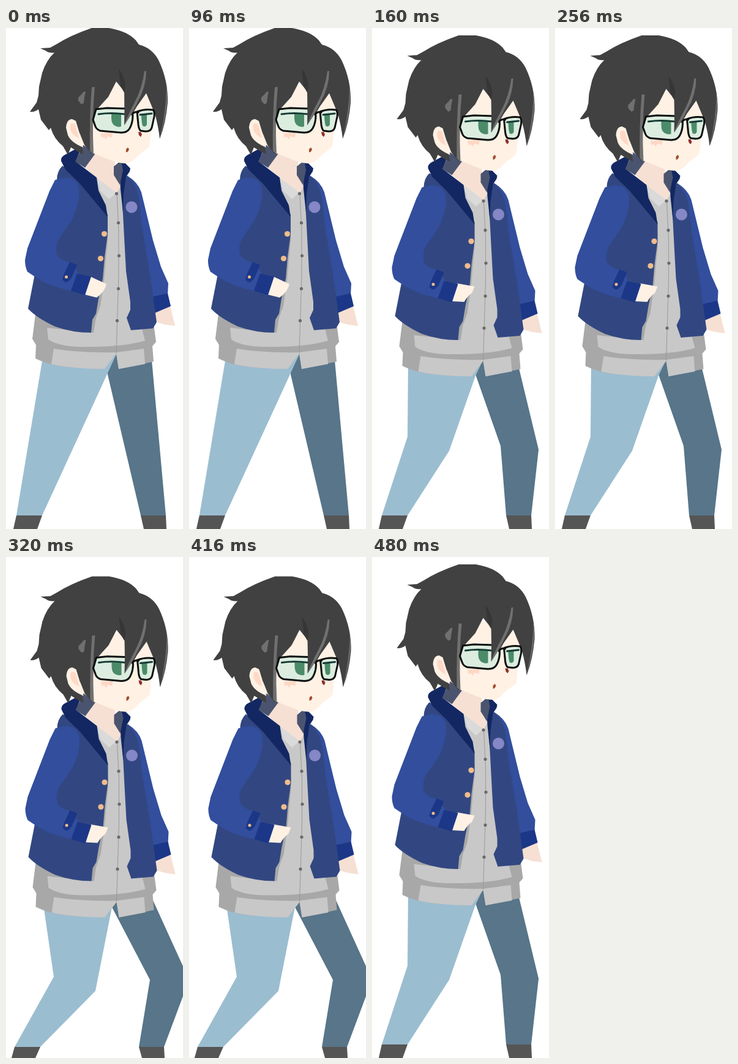
Write an HTML page with a canvas that moves like this. It is 289 px wide and 814 px high and loops after 640 ms.

```html
<!DOCTYPE html>
<html lang="en">
<head>
<meta charset="utf-8">
<title>Walk cycle</title>
<style>
html, body { margin: 0; width: 100%; height: 100%; overflow: hidden; background: #fff; }
canvas { display: block; width: 289px; height: 814px; }
</style>
</head>
<body>
<canvas id="stage" width="289" height="814"></canvas>
<script>
const ctx = document.getElementById('stage').getContext('2d');
const HOLD = 160;

const C = {
  hair: '#414141', hairDark: '#363636', shine: '#707070',
  skin: '#fff1e4', shade: '#f6e0d3', blush: '#ffd8c6',
  body: '#324781', sleeve: '#324e9d', cuff: '#1c3787', collar: '#132762', lining: '#4b546f',
  shirt: '#c8c8c8', fold: '#a8a8a8', tip: '#dadada', stud: '#6a6a6a', gold: '#efbc8c',
  lens: '#dcede0', iris: '#4b8b69', frame: '#0c0f0e',
  near: '#9bbdd0', far: '#587589', shoe: '#555555', badge: '#8587c6'
};

function fill(color, d) {
  ctx.fillStyle = color;
  ctx.fill(new Path2D(d + 'Z'));
}
function line(color, width, d) {
  ctx.strokeStyle = color;
  ctx.lineWidth = width;
  ctx.stroke(new Path2D(d));
}
function dot(color, x, y, r) {
  ctx.fillStyle = color;
  ctx.beginPath();
  ctx.arc(x, y, r, 0, Math.PI * 2);
  ctx.fill();
}

const handLow = 'M138 404L164 416Q161 429 148 438L128 433';
const handHigh = 'M138 403L166 408L162 418Q154 424 149 433L129 432';

// Body offset, hand, leg outlines and foot position for each pose
const poses = [
  { x: 0, y: 0, hand: handLow, foot: 17, floor: 792,
    near: 'M60 535L182 526L59 792H17',
    far: 'M166 518H236L238 540L261 792H220L166 563' },
  { x: 1.5, y: 12, hand: handHigh, foot: 16, floor: 792,
    near: 'M59 545L182 538L169 565L126 687L58 792H16L58 664',
    far: 'M167 530H236L240 553L272 685L260 792H219L210 679L169 563' },
  { x: 0.5, y: 31.5, hand: handHigh, foot: 14, floor: 796,
    near: 'M61 565L182 557L173 569L146 705L56 796H14L78 682',
    far: 'M170 550H236L241 560L299 687L258 796H217L235 687L173 569' }
];

function legs(p) {
  fill(C.far, p.far);
  fill(C.near, p.near);
  const f = p.foot, y = p.floor;
  fill(C.shoe, `M${f} ${y}h42L${f + 34} 814H${f - 5}`);
  fill(C.shoe, `M${f + 203} ${y}h41L${f + 245} 814H${f + 208}`);
}

function shirt() {
  fill(C.fold, 'M48 465L43 505L49 515L48 537Q70 548 100 551L161 554L180 529L184 554L241 542L239 517L245 510L241 480L190 440L150 440');
  fill(C.shirt, 'M140 232L193 242L206 460L204 490L222 489L227 508Q190 519 120 518Q85 517 69 506L67 487L140 495L150 460L158 400');
  fill(C.fold, 'M166 320L166 345L163 375L160 410L154 452L147 470L143 495H138L146 440');
  fill(C.shirt, 'M78 521Q120 528 180 527L225 521L227 546L184 554L180 529L161 554Q100 553 74 546');
  line('#999999', 1, 'M181 270L184 330L184 400L180 528');
}

function jacket(p) {
  // far arm
  fill(C.shade, 'M242 462L268 452L276 484L260 482L246 478');
  fill(C.sleeve, 'M198 240Q216 251 221 267L240 345L253 388L265 415L264 433L238 438L214 330');
  fill(C.cuff, 'M238 437L264 431L269 452L243 463');
  // front panels
  fill(C.body, 'M188 246L198 240Q214 255 217 278L222 322L235 400L246 478L240 488L204 491L197 471L203 458L203 445L196 395L193 340');
  fill(C.body, 'M92 224Q83 233 83 247L60 320L47 400L36 456Q50 471 80 485Q108 495 139 495L141 474L147 464L151 440L158 407L161 372L166 335L166 304L140 246');
  dot(C.gold, 160.5, 334.5, 4.6);
  dot(C.gold, 154.5, 374.5, 4.6);
  dot(C.badge, 205, 291, 9.5);
  // near arm
  fill(C.sleeve, 'M80 247Q112 236 119 259Q122 285 106 314L86 343Q80 357 83 368Q90 380 108 381L119 400L112 428Q72 421 47 404L35 396Q31 388 31 377L35 358L71 265');
  fill(C.skin, p.hand);
  fill(C.cuff, 'M116 399L139 404L129 434L106 427');
  fill(C.cuff, 'M104 380L116 385L107 406Q101 414 97 413L92 409L95 399');
  dot(C.gold, 98.5, 404.5, 2.5);
}

function neck() {
  fill(C.tip, 'M146 238L181 267L168 278L154 265');
  fill(C.shade, 'M114 214L127 190L144 196L178 217L178 238L187 257L181 268L146 242');
  fill(C.collar, 'M189 213L194 219L203 228L202 233L196 242L192 270L191 300L187 262L186 240');
  fill(C.lining, 'M176 225L188 215L191 231L186 255L176 239');
  fill(C.collar, 'M124 191L98 205Q89 209 90 216L97 230L120 252L166 307L163 288L151 264L148 243L114 217');
  fill(C.lining, 'M126 190L146 204L129 227L113 217');
  [[180.5, 269], [183.5, 316.5], [184.5, 370], [183.5, 423.5], [181.5, 475.5]]
    .forEach(([x, y]) => dot(C.stud, x, y, 2.6));
}

function face() {
  fill(C.skin, 'M120 110L225 80L245 135Q238 150 236 175L234 193L216 207Q206 219 198 220Q185 220 174 216L141 203L122 185');
  fill(C.blush, 'M155 171L174 170L173 178L166 176L163 181L160 177L155 178');
  fill('#8f302c', 'M216 169L220 169L222 173L220 177L217 174');
  fill('#a34a2b', 'M199 194L201 197L199 201L196 202L196 197');
}

function hair() {
  fill(C.hair, 'M56 33L72 32L83 26Q105 12 140 0H168Q198 5 212 20L217 27Q238 32 249 52Q265 85 264 121Q261 155 251 180Q249 161 243 139L229 106L214 127L205 142L194 158L193 103L180 87L167 112L147 134L142 150L140 205L128 190L120 170L126 205L119 202L106 194L101 206L93 192Q78 180 73 162L70 166L57 149L53 132Q47 137 39 136L50 121L53 110L54 95L59 73Q66 52 79 40Q70 41 65 37');
  fill(C.skin, 'M98 162Q99 148 108 148L114 151L121 174L126 194Q106 186 101 174');
  fill(C.blush, 'M105 156Q112 153 114 160L119 179Q108 174 105 165');
  fill(C.shine, 'M118 113L124 107L126 104L130 103L128 113L127 122L123 124L118 118');
  fill(C.shine, 'M140 96L145 96Q140 145 143 205L137 200Q136 145 140 96');
  fill(C.shine, 'M262 94Q267 126 251 180Q262 132 262 94');
}

function glasses() {
  const left = 'M147 132L165 130L195 131Q203 132 207 142Q207 154 202 163Q198 170 188 170L154 167Q148 165 146 160L142 149Z';
  const right = 'M214 136Q226 131 240 133Q243 135 242 144L238 162Q236 168 228 168L220 167Q217 165 216 157Z';
  fill(C.lens, left);
  fill(C.lens, right);
  fill(C.iris, 'M172 140H188V160Q184 162 178 159Q172 156 172 146');
  fill(C.iris, 'M221 140H230L230 157Q228 162 223 159Q221 152 221 140');
  line('#173b35', 3, 'M151 140Q171 137 194 140');
  line('#173b35', 3, 'M219 141L238 139');
  line(C.frame, 3, left);
  line(C.frame, 3, right);
  line(C.frame, 3, 'M206 141Q209 135 216 137');
}

function fringe() {
  fill(C.hair, 'M188 80L229 69Q228 98 213 127L193 158L194 104');
  fill(C.hairDark, 'M184 66Q192 76 195 91L193 105L187 94');
  fill(C.shine, 'M226 70L229 70Q229 96 214 122Q205 141 193 158Q199 141 210 121Q222 99 226 70');
}

function draw(p) {
  ctx.clearRect(0, 0, 289, 814);
  ctx.lineJoin = ctx.lineCap = 'round';
  legs(p);
  ctx.save();
  ctx.translate(p.x, p.y);
  [shirt, jacket, neck, face, hair, glasses, fringe].forEach(part => part(p));
  ctx.restore();
}

const cycle = [0, 1, 2, 1];
const start = performance.now();
function tick() {
  const step = Math.floor((performance.now() - start) / HOLD) % cycle.length;
  draw(poses[cycle[step]]);
  requestAnimationFrame(tick);
}
tick();
</script>
</body>
</html>
```
